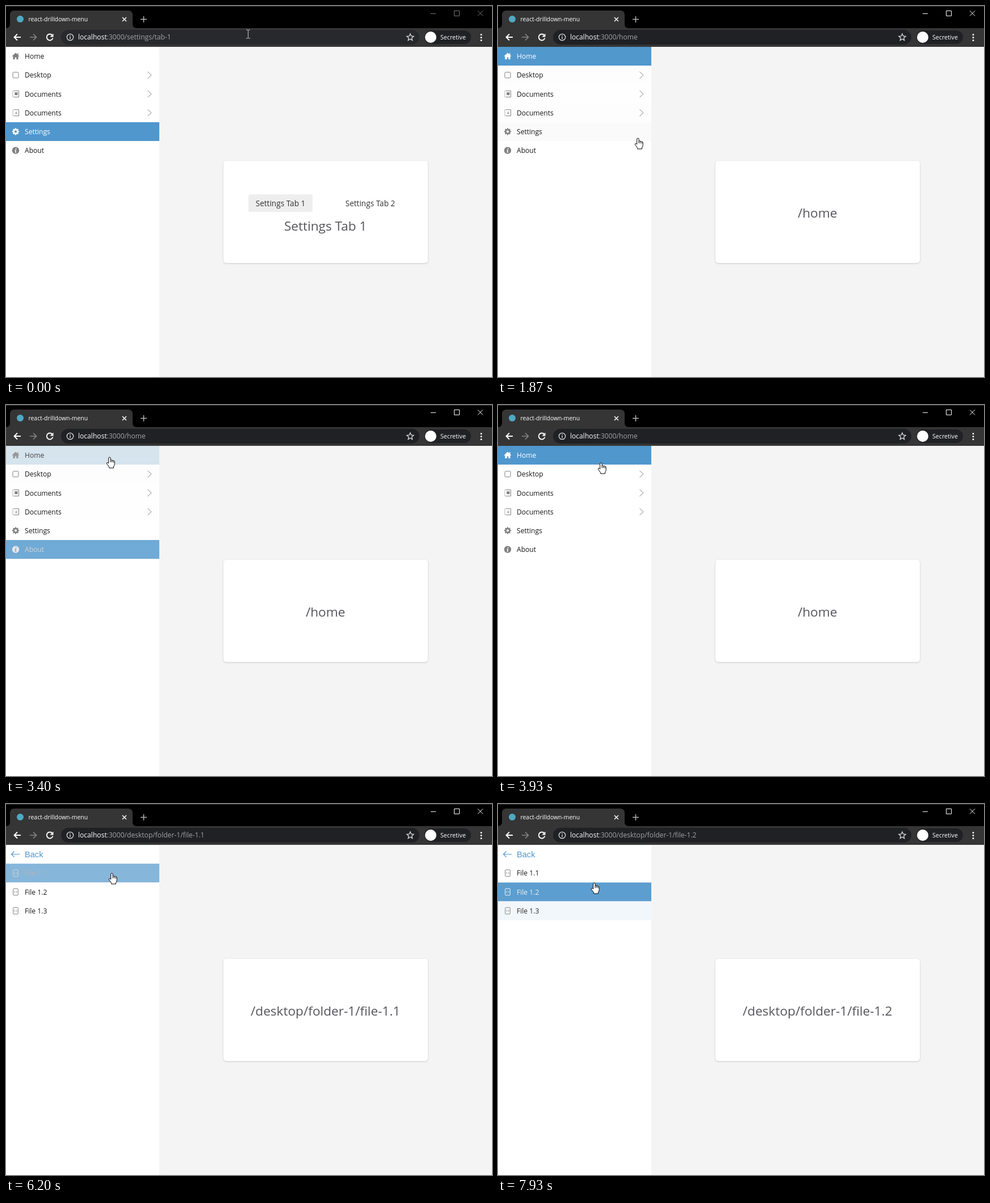
An HTML page that plays this animation: 856x654 px, repeating every 8000 ms.

```html
<!DOCTYPE html>
<html lang="en">
<head>
<meta charset="utf-8">
<title>Drilldown menu</title>
<style>
html, body { margin: 0; width: 100%; height: 100%; overflow: hidden; background: #f4f4f4; }
svg { display: block; width: 856px; height: 654px; font-family: "Open Sans", "Noto Sans", sans-serif; }
.line { fill: none; stroke: currentColor; }
.solid { fill: currentColor; }
.row text { font-size: 12.1px; }
.back { color: #5097cd; font: 14.6px "Liberation Sans", Arial, sans-serif; }
.card { fill: #fff; filter: drop-shadow(0 1px 1.5px rgba(0,0,0,.17)); }
.heading { font-size: 22.6px; fill: #55555c; text-anchor: middle; }
.tab { font-size: 13.6px; fill: #333; text-anchor: middle; }
</style>
</head>
<body>
<svg viewBox="0 0 856 654">
  <defs>
    <clipPath id="side"><rect y="72" width="270" height="582"/></clipPath>
    <g id="home"><path class="solid" d="M0-6 6.3-.3 5.6.5 4.6-.2V5.5H1.3V2H-1.3V5.5H-4.6V-.2L-5.6.5-6.3-.3zM3-5.3h1.6V-2L3-3.4z"/></g>
    <g id="square"><rect class="line" x="-5" y="-5" width="10" height="10" rx="1.5"/></g>
    <g id="page">
      <path class="line" d="M-3.5-5.5h9v11h-9"/>
      <path class="line" stroke-dasharray="1.4 1" d="M-5-5.5V5.8"/>
    </g>
    <g id="notebook"><use href="#page"/><path class="solid" d="M-1.8-2.8h5.4v4.6H1.8L.9 3 0 1.8h-1.8z"/></g>
    <g id="download"><use href="#page"/><path class="line" d="M1-2.2V2M-.8.4 1 2.2 2.8.4"/></g>
    <g id="gear">
      <circle class="line" r="3.5" stroke-width="2.7"/>
      <circle class="line" r="5.2" stroke-width="2" pathLength="16" stroke-dasharray="1" stroke-dashoffset=".5"/>
    </g>
    <g id="info"><path class="solid" fill-rule="evenodd" d="M0-6.2a6.2 6.2 0 1 0 .01 0zM-.2-3.8h1.7v1.6H-.2zM-1.6-1.2h2.6L.4 2.8h1l-.2 1h-2.6l.7-4h-1z"/></g>
    <g id="folder"><path class="line" d="M-5.5 4V-3.5q0-1 1-1h3l1.2 1.5h4.8q1 0 1 1V3.5q0 1-1 1h-9q-1 0-1-1z"/></g>
    <g id="file">
      <rect class="line" x="-4.3" y="-5.8" width="8.6" height="11.6" rx="1"/>
      <path class="line" stroke-width=".9" d="M-1-1.7-2.5 0-1 1.7M1-1.7 2.5 0 1 1.7"/>
    </g>
  </defs>

  <rect width="856" height="72"/>
  <path fill="#333" d="M0 0h856v1H0z"/>
  <path fill="#353535" d="M0 39q7 0 7-7V16q0-8 8-8h200q8 0 8 8v16q0 7 7 7h626v33H0z"/>
  <circle cx="25" cy="23" r="6" fill="#4fa9c4"/>
  <text x="39.5" y="27" font-size="10.4" fill="#fff">react-drilldown-menu</text>
  <g fill="none" stroke="#fff" stroke-width="1.5">
    <path d="m205 20 7 7m0-7-7 7"/>
    <path stroke="#b5b5b5" d="M237 23.5h11M242.5 18v11"/>
    <path stroke-width="1.9" d="M26 55H14.5M20 49.5 14.5 55l5.5 5.5"/>
    <path stroke="#858585" stroke-width="1.7" d="M42 55h11.5M48 49.5l5.5 5.5-5.5 5.5"/>
    <path stroke-width="1.9" d="M81.5 51.5a5.5 5.5 0 1 0 1 5"/>
    <path fill="#fff" stroke="none" d="M83.5 48.5v6h-6z"/>
  </g>
  <rect id="pill" x="97" y="42" width="631" height="26" rx="13"/>
  <circle cx="113" cy="55" r="5.7" fill="none" stroke="#ddd" stroke-width="1.3"/>
  <path stroke="#ddd" stroke-width="1.4" d="M113 51.5v1.5m0 1v4.2"/>
  <text x="127" y="59.3" font-size="12.1" fill="#a0a3a6"><tspan fill="#fff">localhost</tspan><tspan id="path"></tspan></text>
  <path fill="none" stroke="#ddd" stroke-width="1.3" d="m712 49 1.7 4 4.3.4-3.3 2.8 1 4.3-3.7-2.3-3.7 2.3 1-4.3-3.3-2.8 4.3-.4z"/>
  <rect x="737" y="43" width="82" height="24" rx="12" fill="#202124"/>
  <circle cx="748" cy="55" r="10" fill="#fff"/>
  <text x="765" y="59" font-size="10.7" fill="#fff">Secretive</text>
  <path stroke="#fff" stroke-width="3" stroke-linecap="round" d="M837 50.5h0m0 5h0m0 5h0"/>
  <path id="buttons" fill="none" d="M748 13.5h9M789.5 8.5h9v9h-9zM831 8.5l9 9m0-9-9 9"/>

  <rect y="72" width="856" height="582" fill="#f4f4f4"/>
  <rect y="72" width="270" height="582" fill="#fff"/>
  <g id="menus" clip-path="url(#side)"></g>

  <rect class="card" x="383" y="273" width="360" height="180" rx="5"/>
  <g id="tabs">
    <rect x="427" y="332" width="113" height="31" rx="3" fill="#eee"/>
    <text class="tab" x="483.5" y="353">Settings Tab 1</text>
    <text class="tab" x="641.5" y="353">Settings Tab 2</text>
  </g>
  <text id="heading" class="heading" x="562.7"></text>

  <g id="cursor">
    <path id="ibeam" fill="none" stroke="#c8c8c8" d="M-3.5-7.5h2.5l1 1 1-1h2.5M0-6.5v13M-3.5 7.5h2.5l1-1 1 1h2.5"/>
    <path id="arrow" fill="#fff" stroke="#000" d="M0 0v16l3.7-3.6 2.6 6 2.5-1-2.6-6h5z"/>
    <g id="hand" stroke="#000" stroke-linejoin="round">
      <path fill="#fff" d="M0-.5Q-1.8-.5-1.8 1.5V10.5L-3.3 9Q-5 8.5-5 9.7-5.5 10.5-4.5 11.7L-.8 16.8V18.5H7V16.5Q8.800 14 8.800 11V7Q8.600 5.300 6.800 5.800 6.500 4.700 4.300 5 3.600 4.100 1.700 4.400V1.500Q1.700-.5 0-.5z"/>
      <path fill="none" d="M1.7 4.500V8.500M4.300 5.200V8.500M6.800 6V9"/>
    </g>
  </g>
</svg>
<script>
const LOOP = 8000, STEP = 200 / 3, FADE = 340, SLIDE = 360;
const TOP = 72, PITCH = 33.2, WIDTH = 270;
const $ = id => document.getElementById(id);

const back = { label: 'Back' };
const item = (icon, label, opens) => ({ icon, label, opens });
const menus = [
  [
    item('home', 'Home'), item('square', 'Desktop', true),
    item('notebook', 'Documents', true), item('download', 'Documents', true),
    item('gear', 'Settings'), item('info', 'About')
  ],
  [back, ...[1, 2].map(n => item('folder', `Folder ${n}`, true))],
  [back, ...[1, 2, 3].map(n => item('file', `File 1.${n}`))]
];

const click = (time, menu, row, path) => ({ time, row: menus[menu][row], path });
const clickFile = (time, n) => click(time, 2, n, `/desktop/folder-1/file-1.${n}`);
const clicks = [
  click(-FADE, 0, 4, '/settings/tab-1'),
  click(1560, 0, 0, '/home'), click(2200, 0, 5, '/about'), click(3349, 0, 0, '/home'),
  clickFile(6066, 1), clickFile(6967, 3), clickFile(7706, 2)
];
const slides = [[4350, 1], [5180, 2]];

// Stops of the pointer: time, x, y
const stops = [
  [0, 427, 49], [80, 427, 49], [500, 330, 288], [870, 45, 303], [1500, 158, 86],
  [1600, 158, 86], [1870, 247, 233], [2150, 188, 254], [2800, 184, 250], [3350, 183, 92],
  [3800, 183, 95], [4200, 180, 122], [4700, 180, 122], [5130, 185, 122], [6060, 185, 122],
  [6200, 187, 122], [6600, 185, 126], [6930, 155, 185], [7130, 155, 185], [7500, 166, 150],
  [7700, 166, 150], [7930, 170, 139]
];

const lerp = (a, b, p) => a + (b - a) * p;
const clamp = p => Math.min(1, Math.max(0, p));
const mix = (a, b, p) => a.map((v, i) => lerp(v, b[i], p));
const rgb = c => `rgb(${c.map(Math.round)})`;

// CSS "ease": cubic-bezier(.25, .1, .25, 1)
function ease(x) {
  const bez = (a, b, s) => 3 * a * s * (1 - s) ** 2 + 3 * b * s * s * (1 - s) + s ** 3;
  let lo = 0, hi = 1;
  for (let i = 0; i < 18; i++) {
    const s = (lo + hi) / 2;
    if (bez(.25, .25, s) < x) lo = s; else hi = s;
  }
  return bez(.1, 1, lo);
}

// Value at t of a transition that the next event may interrupt
function level(events, t, duration) {
  let value = 0;
  events.forEach(([start, target], i) => {
    if (t < start) return;
    const end = Math.min(t, events[i + 1] ? events[i + 1][0] : t);
    value = lerp(value, target, ease(clamp((end - start) / duration)));
  });
  return value;
}

function pointer(t) {
  const i = stops.findIndex(s => s[0] > t);
  if (i < 0) return stops[stops.length - 1].slice(1);
  const a = stops[i - 1], b = stops[i], p = (t - a[0]) / (b[0] - a[0]);
  return mix(a, b, p * p * (3 - 2 * p)).slice(1);
}

function rowAt(t) {
  const [x, y] = pointer(t);
  const menu = menus[slides.filter(s => s[0] <= t).length];
  return x < WIDTH ? menu[Math.floor((y - TOP) / PITCH)] : undefined;
}

// Hover is only re-evaluated while the pointer moves
const visits = [];
let under;
for (let t = STEP; t < LOOP; t += STEP / 4) {
  const moved = String(pointer(t)) !== String(pointer(t - STEP / 4));
  if (moved && rowAt(t) !== under) visits.push([t, under = rowAt(t)]);
}
for (const row of menus.flat()) {
  row.selection = clicks.map(c => [c.time, +(c.row === row)]);
  row.hover = visits.map(([time, visited]) => [time, +(visited === row)]);
}

function rowMarkup({ icon, label, opens }, i) {
  const top = TOP + i * PITCH, mid = top + PITCH / 2;
  if (!icon) return `<g class="back"><path class="line" stroke-width="1.2" d="M24 88.5H9.5M14.5 83.5l-5 5 5 5"/>
    <text class="solid" x="33" y="93.5">${label}</text></g>`;
  return `<g class="row"><rect y="${top}" width="${WIDTH}" height="${PITCH}"/>
    <use href="#${icon}" x="17" y="${mid}"/>
    <text x="33" y="${mid + 4.6}">${label}</text>
    ${opens ? `<path fill="none" stroke="#888" d="M249.5 ${mid - 6}l6.5 6-6.5 6"/>` : ''}</g>`;
}

$('menus').innerHTML = menus.map(rows => `<g>${rows.map(rowMarkup).join('')}</g>`).join('');
const panes = [...$('menus').children];

const WHITE = [255, 255, 255], HOVER = [240, 240, 240], BLUE = [80, 151, 205];
const INK = [24, 24, 24], GREY = [128, 128, 128];

function drawRow(el, row, t) {
  if (!row.icon) return;
  const on = level(row.selection, t, FADE);
  const [bg, glyph, label] = el.children;
  bg.style.fill = rgb(mix(mix(WHITE, HOVER, level(row.hover, t, FADE)), BLUE, on));
  glyph.style.color = rgb(mix(GREY, WHITE, on));
  label.style.fill = rgb(mix(INK, WHITE, on));
}

function draw(t) {
  const slide = level(slides, t, SLIDE);
  panes.forEach((pane, k) => {
    pane.setAttribute('transform', `translate(${((k - slide) * WIDTH).toFixed(2)})`);
    menus[k].forEach((row, i) => drawRow(pane.children[i], row, t));
  });

  const { path } = clicks.filter(c => c.time <= t).pop();
  const onTabs = path.startsWith('/settings');
  $('path').textContent = ':3000' + path;
  $('heading').textContent = onTabs ? 'Settings Tab 1' : path;
  $('heading').setAttribute('y', onTabs ? 395.5 : 373);
  $('tabs').style.display = onTabs ? '' : 'none';
  $('buttons').style.stroke = onTabs ? '#777' : '#fff';

  const [x, y] = pointer(t);
  const shape = y < TOP ? 'ibeam' : rowAt(t) ? 'hand' : 'arrow';
  for (const id of ['ibeam', 'arrow', 'hand']) $(id).style.display = id === shape ? '' : 'none';
  $('cursor').setAttribute('transform', `translate(${Math.round(x) - .5} ${Math.round(y) + .5})`);
  $('pill').style.fill = shape === 'ibeam' ? '#28292c' : '#202124';
}

const start = performance.now();
function tick() {
  const t = (performance.now() - start) % LOOP;
  draw(Math.floor((t + 4) / STEP) * STEP);
  requestAnimationFrame(tick);
}
tick();
</script>
</body>
</html>
```
